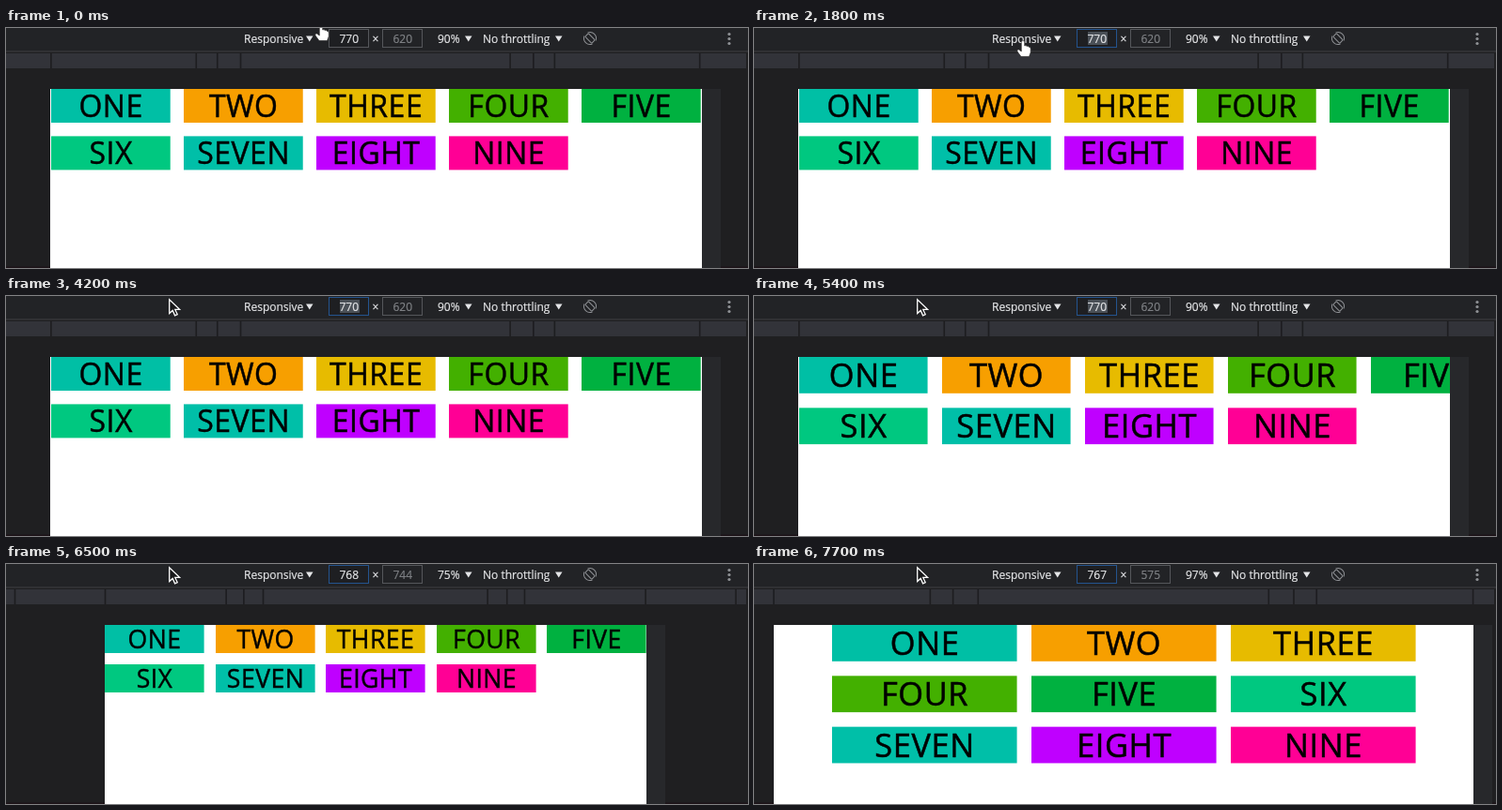
These frames come from a looping animation (789x256 px, 8 s). An HTML page:

```html
<!DOCTYPE html>
<html lang="en">
<head>
<meta charset="utf-8">
<title>Responsive grid in device toolbar</title>
<style>
  html, body { margin: 0; width: 789px; height: 256px; overflow: hidden; background: #1f1f21; }
  svg { display: block; font-family: "Open Sans", "Noto Sans", sans-serif; }
  .bar { font-size: 12px; fill: #e4e5e7; }
  .bar text { stroke: currentColor; stroke-width: .2; color: #e4e5e7; }
  .bar .dim { fill: #7f8185; color: #7f8185; }
  .label { letter-spacing: .6px; font-size: 35.5px; text-anchor: middle; stroke: #000; stroke-width: .5; }
</style>
</head>
<body>
<svg width="789" height="256" viewBox="0 0 789 256">
  <rect width="789" height="256" fill="#1f1f21"/>
  <rect y="254.5" width="789" height="1.5" fill="#1d1318"/>
  <rect width="789" height="25" fill="#222326"/>
  <rect y="24.5" width="789" height="1" fill="#404145"/>
  <rect y="27" width="787" height="16" fill="#323339"/>
  <g id="ticks" fill="#1d1d20"></g>

  <rect id="handle" y="65" width="20" height="191" fill="#27282b"/>
  <rect id="page" y="65" height="191" fill="#fff"/>
  <clipPath id="pageClip"><rect id="clipRect" y="65" height="191"/></clipPath>
  <g clip-path="url(#pageClip)"><g id="tiles"></g></g>

  <g class="bar">
    <text x="253" y="16">Responsive</text>
    <path d="M319 8.5h7.5l-3.75 6zM488 8.5h7.5l-3.75 6zM584 8.5h7.5l-3.75 6z"/>
    <rect id="field" x="343.5" y="1.5" width="42" height="19" fill="#1e1f22"/>
    <rect id="selection" x="355" y="4" width="21" height="14" fill="#4a5057"/>
    <text id="width" x="354.5" y="16"></text>
    <rect id="caret" x="374.8" y="5" width="1" height="13"/>
    <text x="389.5" y="16">×</text>
    <rect x="400.5" y="1.5" width="42" height="19" fill="#222326" stroke="#55575b"/>
    <text id="height" class="dim" x="411.5" y="16"></text>
    <text id="zoom" x="459" y="16"></text>
    <text x="507" y="16">No throttling</text>
    <g fill="none" stroke="#8f9195" transform="translate(621 11) rotate(-45)">
      <rect x="-2.5" y="-5" width="5" height="10" rx="1"/>
      <path d="M-2.5-6A6.5 6.5 0 0 0-2.5 6M2.5-6A6.5 6.5 0 0 1 2.5 6"/>
    </g>
    <g fill="#909296">
      <circle cx="769" cy="6.5" r="1.6"/><circle cx="769" cy="11.5" r="1.6"/><circle cx="769" cy="16.5" r="1.6"/>
    </g>
  </g>

  <g id="arrow"><path d="M.7 .8V15.6L4.2 12.4L6.6 17.8L9.2 16.6L6.8 11.4H11.6Z" fill="#171719" stroke="#fff" stroke-width="1.3"/></g>
  <g id="hand"><path d="M-1.7 1.5Q0-.8 1.7 1.5V6Q3.2 5 4.2 6.6Q5.7 5.8 6.4 7.4Q8 7 8.2 9V13L6.5 17.5H-2L-6 12Q-6.8 9.6-4.5 10L-1.7 12Z" fill="#fff" stroke="#222" stroke-width=".6"/></g>
  <g id="beam" fill="none">
    <path id="beamPath" d="M-3-8.5Q0-8.5 0-6.5Q0-8.5 3-8.5M0-6.5V6.5M-3 8.5Q0 8.5 0 6.5Q0 8.5 3 8.5" stroke="#fff" stroke-width="2.2"/>
    <path d="M0-7V7" stroke="#111"/>
  </g>
</svg>
<script>
const LOOP = 8000, CENTER = 393.5, TOP = 65, GAP = 16;
const $ = id => document.getElementById(id);

const TILES = [
  ["ONE", "#00bfa5"], ["TWO", "#f79f00"], ["THREE", "#e7bb00"],
  ["FOUR", "#43b000"], ["FIVE", "#00b140"], ["SIX", "#00c880"],
  ["SEVEN", "#00bfa8"], ["EIGHT", "#bf00ff"], ["NINE", "#ff0095"]
];

// The rendered content changes scale before or after the device frame does.
const VIEWS = [
  { at: 0, width: 770, height: 620, zoom: .9, scale: .9 },
  { at: 5400, width: 770, height: 620, zoom: .9, scale: .97 },
  { at: 5500, width: 769, height: 575, zoom: .97, scale: .97 },
  { at: 5800, width: 769, height: 575, zoom: .97, scale: .75 },
  { at: 6000, width: 768, height: 744, zoom: .75, scale: .75 },
  { at: 7100, width: 768, height: 744, zoom: .75, scale: .97 },
  { at: 7400, width: 767, height: 575, zoom: .97, scale: .97 }
];

// [time, shape, x, y]
const CURSOR = [
  [0, "hand", 335, -4], [100, "hand", 332, -1], [200, "hand", 331, 1],
  [300, "arrow", 335, 0], [400, "arrow", 343, 0], [500, "beam", 354, 8],
  [600, "beam", 357, 10], [900, "beam", 364, 11], [1000, "beam", 370, 12],
  [1400, "beam", 371, 12], [1500, "beam", 372, 13],
  [1800, "hand", 286, 13], [1900, "hand", 262, 17], [2000, "arrow", 235, 20],
  [2400, "arrow", 164, 5], [2800, "arrow", 167, 2], [3100, "arrow", 175, -20],
  [3300, "arrow", 175, -1], [4100, "arrow", 174, 1], [4200, "arrow", 173, 3]
];
// Times at which the pointer starts to glide; elsewhere it rests.
const GLIDES = [2000, 2800];

const BREAKPOINTS = [320, 375, 425, 768, 1024];

function make(tag, parent, attrs = {}) {
  const el = document.createElementNS("http://www.w3.org/2000/svg", tag);
  set(el, attrs);
  return parent.appendChild(el);
}

function set(el, attrs) {
  for (const key in attrs) el.setAttribute(key, attrs[key]);
}

const show = (el, visible) => set(el, { visibility: visible ? "visible" : "hidden" });

const tiles = TILES.map(([word, fill]) => {
  const group = make("g", $("tiles"));
  const box = make("rect", group, { height: 40, fill });
  const label = make("text", group, { class: "label", y: 33 });
  label.textContent = word;
  return { group, box, label };
});

const ticks = BREAKPOINTS.flatMap(size => [-1, 1].map(side => ({
  offset: side * size / 2,
  inset: side > 0 ? 2.2 : .8,
  el: make("rect", $("ticks"), { y: 27, width: 1.6, height: 16 })
})));

function drawView({ width, height, zoom, scale }) {
  const left = CENTER - width * zoom / 2;
  const x = Math.floor(left);
  const right = Math.floor(CENTER + width * zoom / 2);
  for (const id of ["page", "clipRect"]) set($(id), { x, width: right - x });
  set($("handle"), { x: right });
  $("width").textContent = width;
  $("height").textContent = height;
  $("zoom").textContent = Math.round(zoom * 100) + "%";

  for (const { offset, inset, el } of ticks) set(el, { x: CENTER + offset * zoom - inset });

  const narrow = width < 768;
  const columns = narrow ? 3 : 5;
  const gridWidth = narrow ? 640 : 768;
  const tileWidth = (gridWidth - GAP * (columns - 1)) / columns;
  const origin = x + (width - gridWidth) / 2 * scale;
  tiles.forEach(({ group, box, label }, i) => {
    const tx = Math.round(origin + (i % columns) * (tileWidth + GAP) * scale);
    const ty = TOP + Math.floor(i / columns) * (40 + GAP) * scale;
    set(group, { transform: `translate(${tx} ${ty}) scale(${scale})` });
    set(box, { width: tileWidth });
    set(label, { x: tileWidth / 2 + .3 });
  });
}

function drawCursor(time) {
  const index = CURSOR.findLastIndex(key => key[0] <= time);
  let [start, shape, x, y] = CURSOR[index];
  if (GLIDES.includes(start)) {
    const [end, , nextX, nextY] = CURSOR[index + 1];
    const p = (time - start) / (end - start);
    x += (nextX - x) * p;
    y += (nextY - y) * p;
  }
  for (const id of ["arrow", "hand", "beam"]) show($(id), id === shape);
  set($(shape), { transform: `translate(${x} ${y})` });
}

function draw(time) {
  const step = Math.floor(time / 100) * 100;
  drawView(VIEWS.findLast(view => view.at <= step));
  drawCursor(step);
  set($("field"), { stroke: step >= 1300 ? "#24548f" : "#55575b" });
  show($("selection"), step >= 1400 && step < 5500);
  show($("caret"), (step >= 5500 && step < 6500) || (step >= 7100 && step < 7700));
}

const began = performance.now();
function tick() {
  draw((performance.now() - began) % LOOP);
  requestAnimationFrame(tick);
}
draw(0);
requestAnimationFrame(tick);
</script>
</body>
</html>
```
